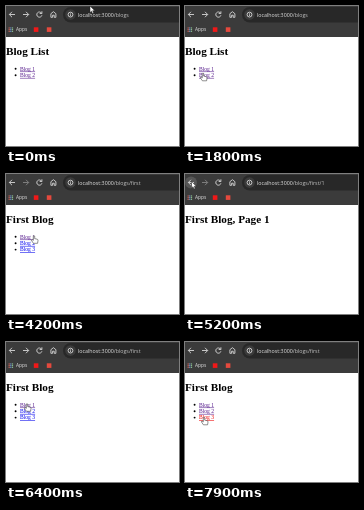
These frames come from a looping animation (173 by 140 pixels, 8 s). An HTML page:

```html
<!DOCTYPE html>
<html lang="en">
<head>
<meta charset="utf-8">
<title>Blog navigation</title>
<style>
html, body { margin: 0; width: 100%; height: 100%; overflow: hidden; background: #fff; }
svg { display: block; width: 173px; height: 140px; }
.ui { font-family: "Open Sans", "Noto Sans", sans-serif; fill: #e3e3e3; }
.serif { font-family: "Liberation Serif", "Times New Roman", serif; }
.icon { fill: none; stroke: #d6d6d6; stroke-width: .9; }
.link { font-size: 5.6px; fill: #00e; text-decoration: underline; }
.visited { fill: #551a8b; }
.pressed { fill: #e00; }
#cursor path { fill: #fff; stroke: #222; stroke-width: .5; stroke-linejoin: round; }
</style>
</head>
<body>
<svg viewBox="0 0 173 140">
  <rect width="173" height="140" fill="#fff"/>
  <rect width="173" height="31" fill="#3b3b3b"/>
  <rect x="57" y="1" width="140" height="15.5" rx="7.7" fill="#282828"/>
  <circle id="hover" cx="6" cy="8.5" r="6" fill="#565656"/>
  <g class="icon">
    <path d="M9 8.5H3.4M6 5.8 3.3 8.5 6 11.2"/>
    <path id="forward" d="M17 8.5h5.6M20 5.8l2.7 2.7-2.7 2.7"/>
    <path d="M35.6 7.2A2.6 2.6 0 1 0 35.9 9.3M35.9 5.3v2.2h-2.2"/>
    <path d="M44.9 11.3V7.7L47.4 5.7l2.5 2v3.6h-1.7V9.2h-1.6v2.1z"/>
  </g>
  <circle cx="64.5" cy="8.6" r="5.3" fill="#3b3b3b"/>
  <circle class="icon" cx="64.5" cy="8.6" r="2.4" stroke-width=".7"/>
  <path class="icon" d="M64.5 8.3v1.6M64.5 7v.6"/>
  <text class="ui" x="72" y="10.6" font-size="5.3">localhost:3000<tspan id="path" fill="#c4c4c4"></tspan></text>
  <g id="apps"></g>
  <text class="ui" x="10" y="25.4" font-size="4.8">Apps</text>
  <rect x="27.8" y="21.3" width="4.6" height="4.6" fill="#f01818"/>
  <rect x="40.8" y="21.3" width="4.6" height="4.6" fill="#e5493d"/>
  <text id="title" class="serif" x="0" y="49.3" font-size="11.2" font-weight="bold"></text>
  <g id="list" class="serif"></g>
  <g id="cursor">
    <path id="arrow" d="M0 0v6.6l1.5-1.4 1 2.3 1.2-.5-1-2.3h2.1z"/>
    <path id="hand" d="M-.7.5Q0-.5.7.5v2.6l2.5.6q.9.3.8 1.3L3.6 7.8H-.6L-2.5 5q-.3-1 .6-.9l1.2.8z"/>
  </g>
</svg>
<script>
const LOOP = 8000, STEP = 100;
const $ = id => document.getElementById(id);

function add(parent, tag, attrs, text = "") {
  const el = document.createElementNS("http://www.w3.org/2000/svg", tag);
  for (const key in attrs) el.setAttribute(key, attrs[key]);
  el.textContent = text;
  return parent.appendChild(el);
}

for (let i = 0; i < 9; i++) {
  add($("apps"), "rect", {
    x: 2.6 + i % 3 * 1.7, y: 21.4 + Math.floor(i / 3) * 1.7,
    width: 1.1, height: 1.1, fill: ["#e0665c", "#79a9e8", "#8fc58f"][i % 3]
  });
}

const rowY = i => 64.5 + i * 6.4;
const rows = [0, 1, 2].map(i => {
  const g = add($("list"), "g", {});
  add(g, "circle", { cx: 9.6, cy: rowY(i) - 1.7, r: .95 });
  return { g, link: add(g, "text", { x: 14, y: rowY(i) }, "Blog " + (i + 1)) };
});

// from: start time, links: rows listed, seen: visited rows, next: forward available
const page = (from, path, title, links, seen, next) => ({ from, path, title, links, seen, next });
const pages = [
  page(0, "/blogs", "Blog List", 2, 2, true),
  page(2300, "/blogs/first", "First Blog", 3, 1, false),
  page(4500, "/blogs/first/1", "First Blog, Page 1", 0, 0, false),
  page(5500, "/blogs/first", "First Blog", 3, 1, true),
  page(6600, "/blogs/first/2", "First Blog, Page 2", 0, 0, false),
  page(7300, "/blogs/first", "First Blog", 3, 2, true)
];

// press time and row
const presses = [[2200, 0], [4400, 0], [6500, 1], [7900, 2]];

// time, x, y of the pointer tip
const route = [
  [0, 84, 0], [200, 100, 12], [500, 45, 45], [800, 15, 67], [900, 15, 67],
  [1400, 146, 14], [1800, 18, 67], [2100, 18, 62.5], [2700, 19, 63],
  [3000, 19, 69], [3100, 19, 69], [3400, 20, 70.5], [3800, 27, 63],
  [3900, 27, 63], [4200, 28, 61.5], [4500, 28, 61.5], [4800, 10, 14],
  [5200, 6.5, 7.5], [5700, 7, 8], [6100, 19, 76], [6400, 21, 61.5],
  [6600, 19, 68.5], [6900, 7, 8], [7400, 7, 8], [7700, 16, 60], [7900, 19, 75]
];

function pointer(t) {
  const i = route.findIndex(p => p[0] > t);
  if (i < 0) return route[route.length - 1].slice(1);
  const a = route[i - 1], b = route[i];
  const u = (t - a[0]) / (b[0] - a[0]), k = u * u * (3 - 2 * u);
  return [a[1] + (b[1] - a[1]) * k, a[2] + (b[2] - a[2]) * k];
}

const show = (el, on) => { el.style.display = on ? "" : "none"; };

function draw(t) {
  const now = pages.filter(p => p.from <= t).pop();
  const [x, y] = pointer(t);
  $("path").textContent = now.path;
  $("title").textContent = now.title;
  $("forward").style.stroke = now.next ? "" : "#858585";

  rows.forEach(({ g, link }, i) => {
    const down = presses.some(([at, row]) => row === i && t === at);
    show(g, i < now.links);
    link.setAttribute("class", "link" + (down ? " pressed" : i < now.seen ? " visited" : ""));
  });

  const onLink = x > 13 && x < 30 && y > 60 && y < 60 + now.links * 6.4;
  show($("hand"), onLink);
  show($("arrow"), !onLink);
  show($("hover"), Math.hypot(x - 6, y - 8.5) < 6);
  $("cursor").setAttribute("transform", `translate(${x} ${y})`);
}

function tick() {
  const t = performance.now() % LOOP;
  draw(Math.floor(t / STEP) * STEP);
  requestAnimationFrame(tick);
}
tick();
</script>
</body>
</html>
```
